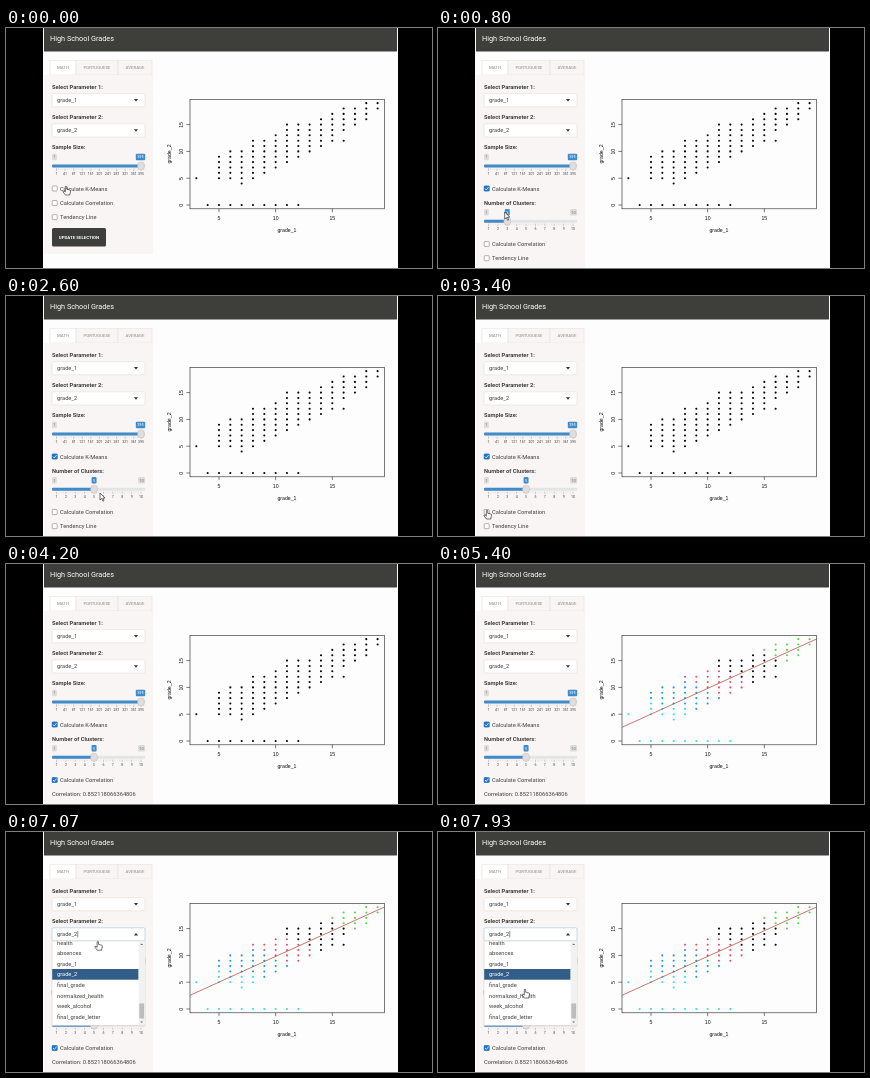
These frames come from a looping animation (426 px wide and 240 px high, 8000 ms). An HTML page:

```html
<!DOCTYPE html>
<html lang="en">
<head>
<meta charset="utf-8">
<title>High School Grades</title>
<style>
  html, body { margin: 0; width: 100%; height: 100%; overflow: hidden; background: #000; }
  svg { display: block; width: 100vw; height: 100vh; }
  text { font-family: Roboto, sans-serif; font-size: 5.72px; fill: #3e3f3a; white-space: pre; }
  .bold { font-weight: 700; }
  .tab { font-size: 4.4px; fill: #8e8c84; }
  .tiny { font-size: 3.5px; }
  .axis { font-family: "Liberation Sans", Arial, sans-serif; font-size: 5.2px; fill: #111; }
</style>
</head>
<body>
<svg id="stage" viewBox="0 0 426 240"></svg>
<script>
const LOOP = 8000;
const NS = 'http://www.w3.org/2000/svg';
const BLUE = '#428bca', DARK = '#3e3f3a', SAND = '#f9f5f4', EDGE = '#dfd7ca';
const stage = document.getElementById('stage');

function add(parent, tag, attrs = {}, content) {
  const el = document.createElementNS(NS, tag);
  for (const key in attrs) el.setAttribute(key, attrs[key]);
  if (content !== undefined) el.textContent = content;
  return parent.appendChild(el);
}
const group = (parent = stage) => add(parent, 'g');
const rect = (p, x, y, width, height, fill, more) =>
  add(p, 'rect', { x, y, width, height, fill, ...more });
const line = (p, x1, y1, x2, y2, stroke, width = 0.5) =>
  add(p, 'line', { x1, y1, x2, y2, stroke, 'stroke-width': width });
const path = (p, d, fill, more) => add(p, 'path', { d, fill, ...more });
const label = (p, x, y, str, cls = '', more) =>
  add(p, 'text', { x, y, class: cls, ...more }, str);
const middle = { 'text-anchor': 'middle' };
const show = (el, on) => el.setAttribute('display', on ? 'inline' : 'none');
const move = (el, x, y) => el.setAttribute('transform', `translate(${x} ${y})`);

// Page, header and tabs
rect(stage, 37, 0, 355, 240, '#fdfdfd');
rect(stage, 38, 0, 353, 23.5, DARK);
label(stage, 44, 13.3, 'High School Grades', '', { style: 'font-size:7.3px;fill:#fff' });
[[44, 26, 'MATH'], [70, 42, 'PORTUGUESE'], [112, 34, 'AVERAGE']].forEach(([x, w, name], i) => {
  rect(stage, x, 32.5, w, 14.5, i ? SAND : '#fff', { stroke: EDGE, 'stroke-width': 0.4 });
  label(stage, x + w / 2, 40.9, name, 'tab', middle);
});

// Sidebar
const panel = rect(stage, 38, 47, 109, 179, SAND);

function select(y, value) {
  const g = group();
  const box = rect(g, 46, y - 6.6, 93, 13.2, '#fff', { rx: 1.3, stroke: EDGE, 'stroke-width': 0.5 });
  label(g, 51, y + 1.9, value);
  const arrow = path(g, 'M-2.1 -1.1H2.1L0 1.4Z', '#333');
  move(arrow, 130, y);
  return { box, arrow };
}

function badge(p, x, y, w, str, fill, color) {
  rect(p, x - w / 2, y - 3.2, w, 6.4, fill, { rx: 1 });
  return label(p, x, y + 1.4, str, 'tiny', { ...middle, style: `font-size:4px;fill:${color}` });
}

function slider(p, y, min, max, marks) {
  const at = v => 50.5 + 84.5 * (v - min) / (max - min);
  badge(p, 48.4, y - 9, 4.8, min, '#dcdcda', '#77766f');
  const top = group(p);
  badge(top, 135.5, y - 9, 7, max, '#dcdcda', '#77766f');
  rect(p, 46, y - 1.5, 93, 3, '#e3e4e6', { rx: 1 });
  const bar = rect(p, 46, y - 1.5, 1, 3, BLUE, { rx: 1 });
  marks.forEach((v, i) => {
    line(p, at(v), y + 2.4, at(v), y + 5, '#888', 0.4);
    if (i) for (let k = 1; k < 4; k++) {
      const x = at(marks[i - 1] + (v - marks[i - 1]) * k / 4);
      line(p, x, y + 2.4, x, y + 3.9, '#bbb', 0.3);
    }
    label(p, at(v), y + 9, v, 'tiny', middle);
  });
  const knob = group(p);
  rect(knob, -3.4, y - 4, 6.8, 8, '#dedede', { rx: 3, stroke: '#b4b4b0', 'stroke-width': 0.4 });
  const flag = group(p);
  const num = badge(flag, 0, y - 9, max > 99 ? 9.4 : 5, '', BLUE, '#fff');
  return v => {
    const x = at(v);
    bar.setAttribute('width', x - 46);
    move(knob, x, 0);
    move(flag, Math.min(x, 134.5), 0);
    num.textContent = v;
    show(top, v < max);
  };
}

function checkbox(p, y, str) {
  rect(p, 46.2, y - 2.5, 5, 5, '#fff', { rx: 0.7, stroke: '#77766f', 'stroke-width': 0.55 });
  const on = group(p);
  rect(on, 45.9, y - 2.8, 5.6, 5.6, '#1f74c9', { rx: 0.8 });
  path(on, `M47 ${y}l1.3 1.4l2.2 -2.8`, 'none', { stroke: '#fff', 'stroke-width': 0.8 });
  label(p, 54, y + 2, str);
  return state => show(on, state);
}

label(stage, 46, 61, 'Select Parameter 1:', 'bold');
select(72.2, 'grade_1');
label(stage, 46, 91, 'Select Parameter 2:', 'bold');
const second = select(102.4, 'grade_2');
label(stage, 46, 121.4, 'Sample Size:', 'bold');
const samples = [...Array(10).keys()].map(i => 1 + 40 * i).concat(395);
slider(stage, 138, 1, 395, samples)(395);
const setMeans = checkbox(stage, 160.5, 'Calculate K-Means');

const clusterBox = group();
label(clusterBox, 46, 176.6, 'Number of Clusters:', 'bold');
const setClusters = slider(clusterBox, 193.2, 1, 10, [...Array(10).keys()].map(i => i + 1));

const corrBox = group();
const setCorr = checkbox(corrBox, 175, 'Calculate Correlation');
const corrText = label(corrBox, 46, 191.3, 'Correlation: 0.852118066364806');
const tail = group();
checkbox(tail, 189.2, 'Tendency Line')(false);
rect(tail, 46, 200, 54, 18.4, DARK, { rx: 1.5 });
label(tail, 73, 210.7, 'UPDATE SELECTION', 'bold', { ...middle, style: 'font-size:4.4px;fill:#fff' });

// Scatter plot
const px = g => 213 + (g - 5) * 11.33;
const py = g => 177 - g * 5.36;
const plot = group();
rect(plot, 184, 71.5, 194.5, 109.3, 'none', { stroke: '#222', 'stroke-width': 0.6 });
[5, 10, 15].forEach(v => {
  line(plot, px(v), 180.8, px(v), 184.2, '#222', 0.6);
  label(plot, px(v), 192, v, 'axis', middle);
});
[0, 5, 10, 15].forEach(v => {
  line(plot, 180.4, py(v), 184, py(v), '#222', 0.6);
  label(plot, 0, 0, v, 'axis', { ...middle, transform: `translate(177 ${py(v) + 0.3}) rotate(-90)` });
});
label(plot, 281, 203.6, 'grade_1', 'axis', middle);
label(plot, 0, 0, 'grade_2', 'axis', { ...middle, transform: 'translate(165.3 126) rotate(-90)' });

// Lowest and highest second grade for first grades 5 to 19
const spans = ['5-9', '5-10', '4-10', '5-12', '6-12', '7-13', '8-15', '9-15', '10-15',
  '11-16', '12-17', '12-18', '15-18', '16-19', '18-19'];
const centers = [
  [14, 14, '#000'], [11, 11, '#df536b'], [17.2, 17, '#61d04f'],
  [8.3, 8.6, '#2297e6'], [6.7, 4, '#28e2e5']
];
const grades = [[3, 5]];
for (let g = 4; g <= 12; g++) grades.push([g, 0]);
spans.forEach((span, i) => {
  const [lo, hi] = span.split('-').map(Number);
  for (let v = lo; v <= hi; v++) if (i !== 11 || v !== 13) grades.push([i + 5, v]);
});
const dots = grades.map(([a, b]) => {
  const dist = c => (a - c[0]) ** 2 + (b - c[1]) ** 2;
  const color = centers.reduce((best, c) => dist(c) < dist(best) ? c : best)[2];
  const el = add(plot, 'circle', { cx: px(a), cy: py(b), r: 1.05 });
  return { el, color };
});
const trend = line(plot, 184, 163.3, 378.5, 75, '#b0402f', 0.7);

// Open list of the second select
const menu = group();
rect(menu, 46, 109, 93, 84.5, '#fff', { stroke: '#c9c5bc', 'stroke-width': 0.5 });
const clip = add(menu, 'clipPath', { id: 'list' });
rect(clip, 46, 109.4, 93, 84);
const list = add(menu, 'g', { 'clip-path': 'url(#list)' });
rect(list, 46.2, 137, 86.4, 10.7, '#325d88');
['health', 'absences', 'grade_1', 'grade_2', 'final_grade', 'normalized_health',
  'week_alcohol', 'final_grade_letter'].forEach((name, i) => {
  label(list, 51, 112.6 + 10.6 * i, name, '', i === 3 ? { style: 'fill:#fff' } : {});
});
rect(menu, 132.6, 109.3, 6.2, 84, '#f1f1f1');
rect(menu, 133.3, 171.5, 4.8, 15, '#bdbdbd');
path(menu, 'M134.4 113l1.3 -1.6l1.3 1.6Z', '#666');
path(menu, 'M134.4 189.4l1.3 1.6l1.3 -1.6Z', '#666');
line(menu, 71.8, 99, 71.8, 105.6, '#222', 0.5);

// Pointer
const ink = { stroke: '#111', 'stroke-width': 0.6, 'stroke-linejoin': 'round' };
const arrow = path(stage, 'M0 0V7L1.7 5.5L2.9 8.2L4 7.7L2.8 5.1H5Z', '#fff', ink);
const hand = path(stage, 'M-.7 .6Q0 -.5 .7 .6V3.2L3.9 4Q4.7 4.3 4.5 5.3L3.7 9H-.6L-3 5.8Q-3 4.6 -1.8 5.2L-.7 6.1Z', '#fff', ink);
const route = [
  [0, 60, 158], [400, 60, 158], [1000, 69, 193], [1600, 68, 202], [1750, 69, 200],
  [2300, 88, 198], [2600, 94, 197], [3300, 49, 214], [3700, 49, 214], [4100, 60, 252],
  [5500, 70, 252], [6150, 93, 98], [6750, 93, 98], [7900, 87, 157], [8000, 87, 157]
];
function pointerAt(t) {
  const i = route.findIndex(stop => stop[0] > t);
  const [t0, x0, y0] = route[i - 1], [t1, x1, y1] = route[i];
  const u = (t - t0) / (t1 - t0), k = u * u * (3 - 2 * u);
  return [x0 + (x1 - x0) * k, y0 + (y1 - y0) * k];
}

function render(t) {
  const means = t >= 330, corr = t >= 3550, fitted = t >= 5000, open = t >= 6600;
  const shift = means ? 41 : 0;

  setMeans(means);
  show(clusterBox, means);
  setClusters(t < 1900 ? 3 : t < 2200 ? 4 : 5);
  setCorr(corr);
  show(corrText, corr);
  move(corrBox, 0, shift);
  move(tail, 0, shift + (corr ? 14.5 : 0));
  panel.setAttribute('height', 179 + shift + (corr ? 14.5 : 0));

  dots.forEach(d => d.el.setAttribute('fill', fitted ? d.color : '#000'));
  show(trend, fitted);

  show(menu, open);
  second.box.setAttribute('stroke', open ? '#8fb4d4' : EDGE);
  second.arrow.setAttribute('transform', `translate(130 102.4) scale(1 ${open ? -1 : 1})`);

  const [x, y] = pointerAt(t);
  const pointing = t < 700 || (t > 3100 && t < 3900) || t > 5950;
  show(hand, pointing);
  show(arrow, !pointing);
  move(hand, x, y);
  move(arrow, x, y);
}

const start = performance.now();
function tick() {
  render((performance.now() - start) % LOOP);
  requestAnimationFrame(tick);
}
render(0);
requestAnimationFrame(tick);
</script>
</body>
</html>
```
